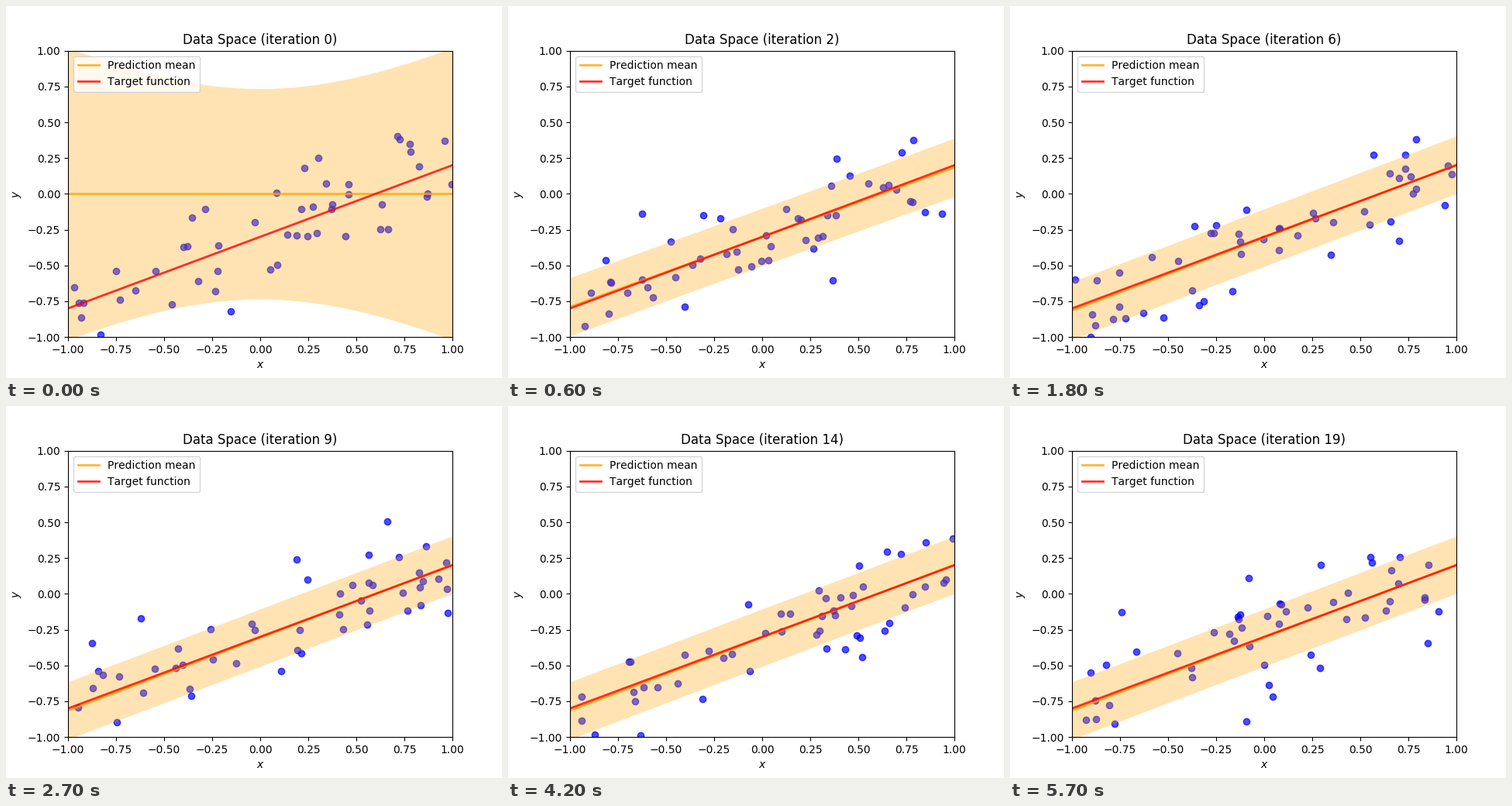
Animation of 640 by 480 pixels, one loop 6000 ms. Source, as a matplotlib script:

```python
import numpy as np
import matplotlib.pyplot as plt
from matplotlib.animation import FuncAnimation

STEPS, STEP_MS = 20, 300
BATCH = 50
ALPHA, BETA = 2.0, 25.0     # prior and noise precision
TARGET = np.array([-0.3, 0.5])      # intercept and slope
SETTLED = np.array([-0.306, 0.509])
FIRST_FIT = np.array([-0.292, 0.435])
DECAY = 0.3                 # share of the fit error kept per update

plt.rcParams["text.kerning_factor"] = 6
grid = np.linspace(-1, 1, 101)


def line(weights, x):
    return weights[0] + weights[1] * x


def samples(step):
    """A fresh batch of noisy points around the target line."""
    rng = np.random.default_rng(step)
    x = rng.uniform(-1, 1, BATCH)
    return x, line(TARGET, x) + rng.normal(0, BETA ** -0.5, BATCH)


def predict(step):
    """Mean and standard deviation of the prediction on the grid."""
    weights = np.zeros(2)
    if step:
        weights = SETTLED + (FIRST_FIT - SETTLED) * DECAY ** (step - 1)
    n = BATCH * step
    var = 1 / BETA + 1 / (ALPHA + BETA * n) + grid ** 2 / (ALPHA + BETA * n / 3)
    return line(weights, grid), np.sqrt(var)


fig, ax = plt.subplots(figsize=(6.4, 4.8), dpi=100)


def draw(step):
    ax.clear()
    mean, std = predict(step)
    ax.scatter(*samples(step), c="blue", alpha=0.7)
    ax.fill_between(grid, mean - std, mean + std,
                    color="orange", alpha=0.3, linewidth=0)
    ax.plot(grid, mean, color="orange", lw=2, alpha=0.8,
            label="Prediction mean")
    ax.plot(grid, line(TARGET, grid), color="red", lw=2, alpha=0.8,
            label="Target function")
    ax.set(xlim=(-1, 1), ylim=(-1, 1), xlabel="$x$", ylabel="$y$",
           title=f"Data Space (iteration {step})")
    ax.legend(loc="upper left")


anim = FuncAnimation(fig, draw, frames=STEPS, interval=STEP_MS,
                     init_func=lambda: None, repeat=True, repeat_delay=0)
plt.show()
```
